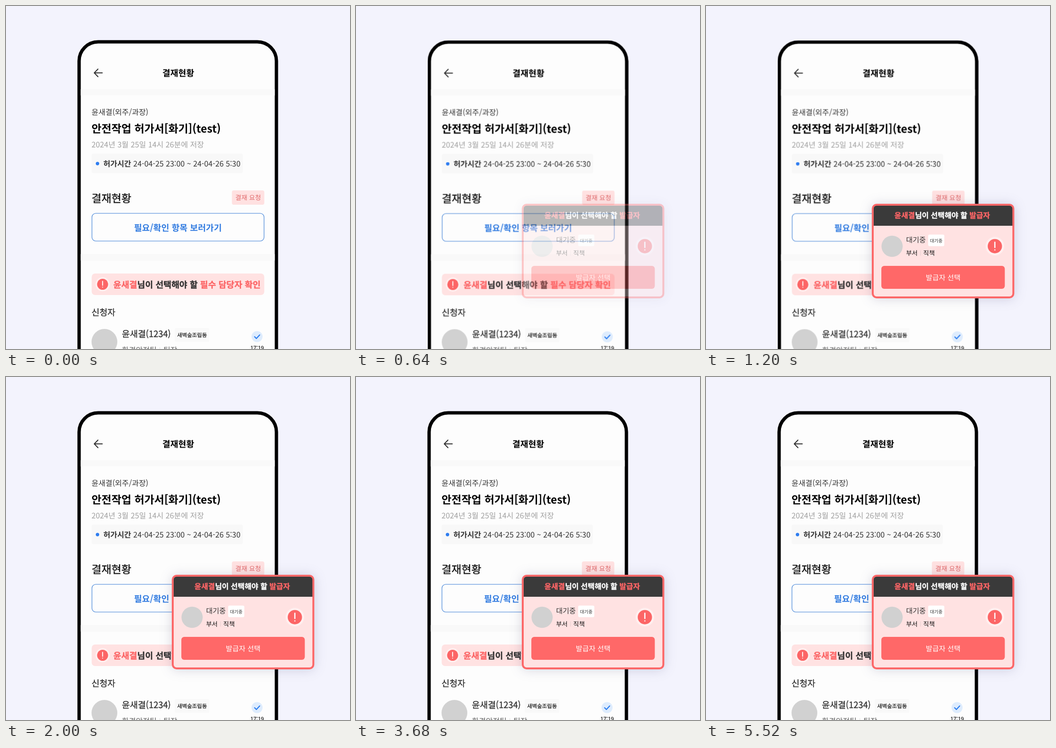
These frames come from a looping animation (720x718 px, 5.6 s). An HTML page:

```html
<!DOCTYPE html>
<html lang="ko">
<head>
<meta charset="utf-8">
<title>결재현황</title>
<style>
html, body { margin: 0; width: 100%; height: 100%; overflow: hidden; background: #f3f3fd; }
svg { display: block; width: 720px; height: 718px; }
text {
  font-family: "Noto Sans CJK KR", "Noto Sans CJK", sans-serif;
  text-rendering: geometricPrecision;
  white-space: pre;
  color: #333;
}
text, tspan { fill: currentColor; }
.b { font-weight: 700; }
.m, .m tspan { stroke: currentColor; stroke-width: .35px; }
.mid { text-anchor: middle; }
.t10 { font-size: 11.3px; }
.t12 { font-size: 13.57px; }
.t14 { font-size: 15.83px; }
.t16 { font-size: 18.1px; }
.t20 { font-size: 22.65px; }
.red { color: #fc6566; }
.line { fill: none; stroke-linecap: round; stroke-linejoin: round; }
.phone { animation: nudge 5600ms step-end infinite; }
.card { filter: drop-shadow(0 1px 12px rgba(60, 60, 110, .2)); animation: appear 5600ms linear infinite; }
@keyframes nudge {
  0%, 27.1% { transform: none; }
  8.5% { transform: translate(.5px, .5px); }
}
@keyframes appear {
  0%, 7.9% { opacity: 0; }
  10% { opacity: .14; }
  11.43% { opacity: .35; }
  12.86% { opacity: .65; }
  14.29% { opacity: .87; }
  15.71% { opacity: .95; }
  18.57%, 100% { opacity: 1; }
}
</style>
</head>
<body>
<svg viewBox="0 0 720 718">
  <defs>
    <g id="warn">
      <circle r="15" fill="#ffefef"/>
      <circle r="11.5" fill="#fc6566"/>
      <path class="line" d="M0-6.3V2.2M0 6v.1" stroke="#fff" stroke-width="1.9"/>
    </g>
  </defs>

  <g class="phone">
    <rect x="153" y="75" width="413" height="720" rx="40" fill="#fdfdfd" stroke="#000" stroke-width="7"/>

    <path class="line" d="M201.5 140H185M192.5 132L184.7 140L192.5 148" stroke="#333" stroke-width="2"/>
    <text class="b t16 mid" x="360.5" y="147.2" color="#000" style="color:#000">결재현황</text>
    <path d="M156.5 174.3h406v13h-406zM156.5 519.3h406v13.5h-406z" fill="#f9f9f9"/>

    <text class="t14" x="179" y="228">윤새결(외주/과장)</text>
    <text class="b t20" x="179" y="265.3" style="color:#000">안전작업 허가서[화기](test)</text>
    <text class="t14" x="179" y="295.8" style="color:#a0a0a0">2024년 3월 25일 14시 26분에 저장</text>

    <rect x="179.4" y="309.3" width="316.4" height="40.5" rx="3" fill="#f8f8f8"/>
    <circle cx="191.5" cy="329.8" r="3.6" fill="#2f7df0"/>
    <text class="t14" x="203.7" y="336.3"><tspan class="b">허가시간</tspan> 24-04-25 23:00 ~ 24-04-26 5:30</text>

    <text class="m t20" x="179" y="410.5" style="color:#111">결재현황</text>
    <rect x="472.8" y="386" width="67.8" height="30" rx="4" fill="#ffe1e1"/>
    <text class="t12 mid" x="506.8" y="406.2" style="color:#e0686a">결재 요청</text>

    <rect x="179.9" y="434" width="360.2" height="58" rx="8" fill="#fdfdfd" stroke="#3c7fd6" stroke-width="1.13"/>
    <text class="b t16 mid" x="359.8" y="470.7" style="color:#317be0">필요/확인 항목 보러가기</text>

    <rect x="179.4" y="560" width="361.2" height="45" rx="7" fill="#ffe2e2"/>
    <use href="#warn" x="202.2" y="582.5"/>
    <text class="b m t16" x="224.6" y="590"><tspan class="red">윤새결</tspan>님이 선택해야 할 <tspan class="red">필수 담당자 확인</tspan></text>

    <text class="m t16" x="179" y="647.5">신청자</text>
    <circle cx="206" cy="703" r="27" fill="#d1d1d1"/>
    <text class="m t16" x="242.6" y="693.2">윤새결(1234)</text>
    <rect x="353.5" y="674" width="72" height="29" rx="3" fill="#f9f9f9"/>
    <text class="m t10" x="358.2" y="692.8">새벽숲조립동</text>
    <text class="t14" x="242.6" y="726" style="color:#666">환경안전팀</text>
    <path d="M322 714v13" stroke="#ddd"/>
    <text class="t14" x="329.5" y="726" style="color:#666">팀장</text>
    <circle cx="525.5" cy="692" r="11.5" fill="#deecfd"/>
    <path class="line" d="M520.3 692.3L524 696L531 688.6" stroke="#2b7df0" stroke-width="2.2"/>
    <text class="m t10 mid" x="525.6" y="720.3">17:19</text>
  </g>

  <g class="card">
    <rect x="349" y="416" width="294.3" height="194" rx="8" fill="#ffe2e2"/>
    <path d="M350 460V424q0-7 7-7h278q7 0 7 7v36z" fill="#3a3a3a"/>
    <rect x="349" y="416" width="294.3" height="194" rx="8" fill="none" stroke="#fc6768" stroke-width="4"/>
    <text class="b m mid" x="494.4" y="444" font-size="15.65" style="color:#fff"><tspan class="red">윤새결</tspan>님이 선택해야 할 <tspan class="red">발급자</tspan></text>

    <circle cx="389.5" cy="503" r="22.2" fill="#d1d1d1"/>
    <text x="418.7" y="494.7" font-size="15">대기중</text>
    <rect x="465" y="478.5" width="33.8" height="24.3" rx="3" fill="#fff"/>
    <text class="mid" x="481.9" y="494.6" font-size="9.5">대기중</text>
    <text x="418.7" y="522" font-size="13.2" style="color:#111">부서</text>
    <path d="M449 511.5v11" stroke="#e3cccc"/>
    <text x="454.6" y="522" font-size="13.2" style="color:#111">직책</text>
    <use href="#warn" transform="translate(604.6 502.7) scale(1.3)"/>

    <rect x="367" y="544" width="258.4" height="48" rx="6" fill="#ff6868"/>
    <text class="mid" x="496.4" y="573.6" font-size="14.9" style="color:#fff">발급자 선택</text>
  </g>
</svg>
</body>
</html>
```
